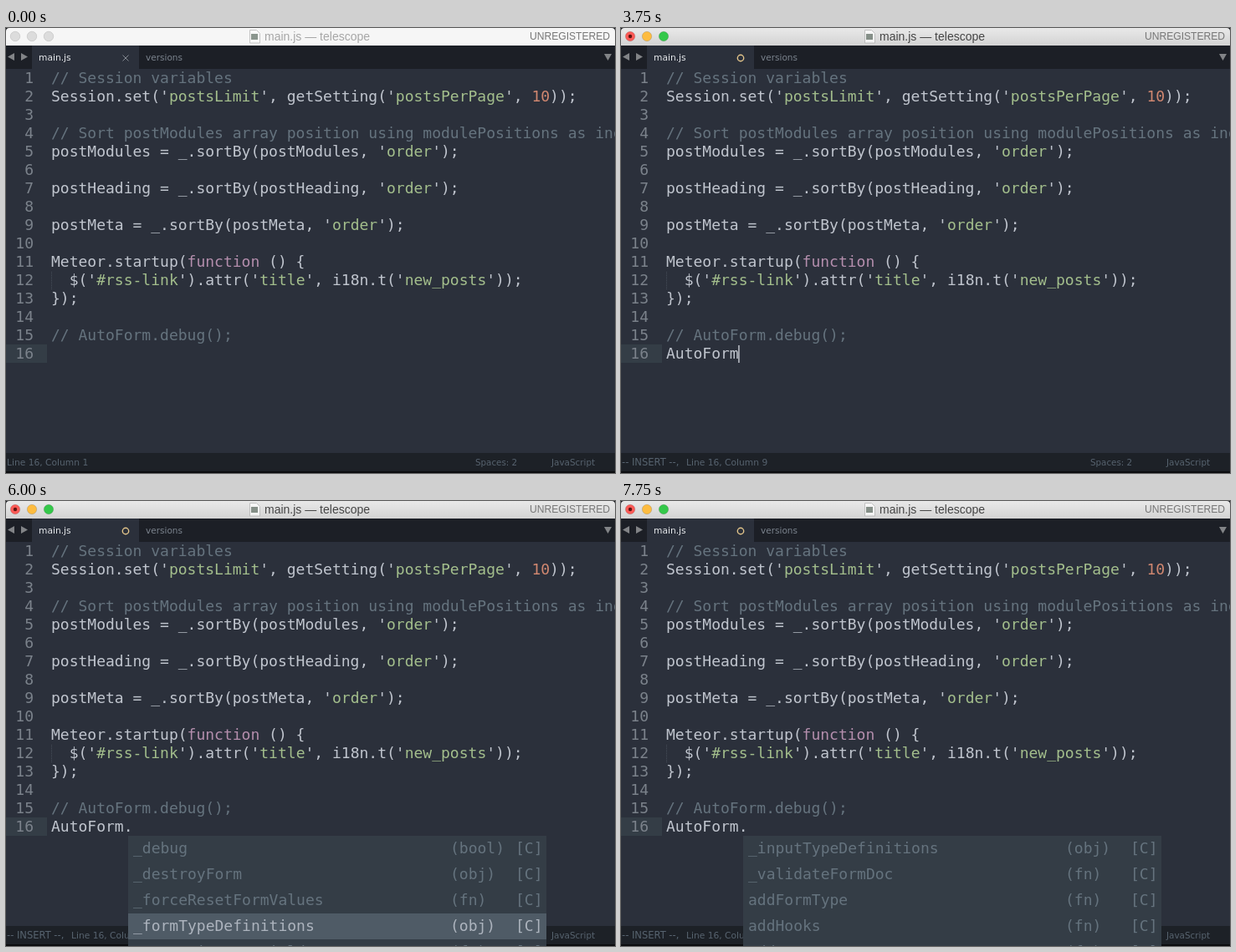
Animation, 728 px wide and 533 px high, one loop 8 s. Source, as an HTML page:

```html
<!DOCTYPE html>
<html lang="en">
<head>
<meta charset="utf-8">
<title>Editor</title>
<style>
  html, body { margin: 0; width: 100%; height: 100%; overflow: hidden; background: #14171c; }
  svg { display: block; width: 728px; height: 533px; }
  text { white-space: pre; }
  .code { font: 18px "DejaVu Sans Mono", monospace; fill: #c0c5ce; }
  .ui { font: 10.7px "DejaVu Sans", sans-serif; fill: #57636f; }
  .title { font: 14px "Liberation Sans", sans-serif; }
  .num { fill: #7b828b; text-anchor: end; }
  .comment { fill: #65737e; }
  .string { fill: #a3be8c; }
  .keyword { fill: #b48ead; }
  .number { fill: #d08770; }
</style>
</head>
<body>
<svg id="stage" viewBox="0 0 728 533">
  <defs>
    <linearGradient id="chrome" x2="0" y2="1">
      <stop stop-color="#e9e9e9"/><stop offset="1" stop-color="#d3d3d3"/>
    </linearGradient>
  </defs>
  <path id="bar" d="M0 21V4Q0 0 4 0H724Q728 0 728 4V21Z"/>
  <g id="lights"></g>
  <circle id="unsaved" cx="11" cy="10" r="2.2" fill="#5d1512"/>
  <g id="icon">
    <path d="M291.5 2.5h8l4 4v11.500h-12z" fill="#fbfbfb" stroke="#b5b5b5"/>
    <rect x="293" y="7" width="8" height="7" fill="#68766c"/>
  </g>
  <text id="name" class="title" x="309" y="15">main.js — telescope</text>
  <text class="title" x="626" y="14" style="font-size:12.1px" fill="#777">UNREGISTERED</text>

  <rect y="21" width="728" height="28" fill="#1c1f26"/>
  <rect y="49" width="728" height="460" fill="#2b303b"/>
  <rect x="31" y="21" width="128" height="28" fill="#2b303b"/>
  <path d="M10 30v9l-8-4.500zM18 30v9l8-4.500zM715 31h9l-4.500 8z" fill="#828487"/>
  <text class="ui" x="39" y="39" style="fill:#e8eaed">main.js</text>
  <text class="ui" x="167" y="39" style="font-size:10.5px;fill:#7b838d">versions</text>
  <path id="close" d="M139.500 32.500l7 7m0-7l-7 7" stroke="#858a92"/>
  <circle id="dirty" cx="143" cy="36" r="3.700" fill="none" stroke="#e3c58b" stroke-width="1.400"/>

  <rect y="379" width="49" height="22" fill="#343d46"/>
  <path d="M54.500 292v21" stroke="#464d58" stroke-dasharray="1 1"/>
  <g id="lines"></g>
  <text id="typed" class="code" x="54" y="396"></text>
  <rect id="caret" y="380" width="1.300" height="21" fill="#d5d9df"/>

  <rect y="509" width="728" height="22" fill="#1d2127"/>
  <rect y="531" width="728" height="2" fill="#0b0c0f"/>
  <text id="mode" class="ui" x="1" y="524" style="font-size:11.500px">-- INSERT --,</text>
  <text id="pos" class="ui" y="524"></text>
  <text class="ui" x="561" y="524" style="font-size:10.300px">Spaces: 2</text>
  <text class="ui" x="652" y="524" style="font-size:10.400px">JavaScript</text>
  <g id="popup"></g>
</svg>
<script>
const $ = id => document.getElementById(id);
const LOOP = 8000, CHAR = 10.836, ROW = 31;

const source = `// Session variables
Session.set('postsLimit', getSetting('postsPerPage', 10));

// Sort postModules array position using modulePositions as index
postModules = _.sortBy(postModules, 'order');

postHeading = _.sortBy(postHeading, 'order');

postMeta = _.sortBy(postMeta, 'order');

Meteor.startup(function () {
  $('#rss-link').attr('title', i18n.t('new_posts'));
});

// AutoForm.debug();
`.split('\n');

const paint = line => line.startsWith('//')
  ? `<tspan class="comment">${line}</tspan>`
  : line.replace(/'([^']*)'|\bfunction\b|\b10\b/g, (m, str) =>
      str ? `'<tspan class="string">${str}</tspan>'`
          : `<tspan class="${m === '10' ? 'number' : 'keyword'}">${m}</tspan>`);

$('lines').innerHTML = source.map((line, i) => {
  const y = 66 + i * 22;
  return `<text class="code num" x="33" y="${y}">${i + 1}</text>
    <text class="code" x="54" y="${y}">${paint(line)}</text>`;
}).join('');

const members = [
  ['_debug', 'bool'], ['_destroyForm', 'obj'], ['_forceResetFormValues', 'fn'],
  ['_formTypeDefinitions', 'obj'], ['_getOptionsForField', 'fn'], ['_globalHooks', 'obj'],
  ['_hooks', 'obj'], ['_inputTypeDefinitions', 'obj'], ['_validateFormDoc', 'fn'],
  ['addFormType', 'fn'], ['addHooks', 'fn'], ['addInputType', 'fn']
];

function popupMarkup(items, x, width, typeX, selected) {
  const height = Math.min(items.length * ROW, 132);
  const rows = items.map(([name, type], i) => {
    const y = 401 + i * ROW, on = i === selected;
    const cell = (cx, s) =>
      `<text class="code" x="${cx}" y="${y + 21}" style="fill:${on ? '#adb4be' : '#65737e'}">${s}</text>`;
    return (on ? `<rect x="${x}" y="${y}" width="${width}" height="${ROW}" fill="#4f5b66"/>` : '') +
      cell(x + 6, name) + cell(typeX, `(${type})`) + cell(x + width - 37, '[C]');
  });
  return `<rect x="${x}" y="401" width="${width}" height="${height}" fill="#343d46"/>` + rows.join('');
}

// Each step changes part of the state: [time, changes]
const steps = [
  [0, { focus: false, insert: false, text: '', list: '', sel: 0, top: 0 }],
  [500, { focus: true }],
  [2250, { insert: true }],
  [2750, { text: 'A' }],
  [3000, { list: 'word' }],
  [3250, { text: 'AutoFo' }],
  [3750, { text: 'AutoForm', list: '' }],
  [4250, { text: 'AutoForm.', list: 'members' }],
  [5750, { sel: 1 }],
  [6000, { sel: 3 }],
  [6250, { sel: 4 }],
  [6500, { sel: 6 }],
  [6750, { sel: 9, top: 2 }],
  [7000, { sel: 11, top: 4 }],
  [7250, { sel: 12, top: 5 }],
  [7500, { sel: 13, top: 6 }],
  [7750, { sel: 14, top: 7 }]
];

function caretOn(t) {
  if (t < 2000) return t % 1000 >= 500;
  if (t < 4250) return t >= 2250;
  return (t + 750) % 1000 < 500;
}

const show = (id, on) => $(id).setAttribute('visibility', on ? 'visible' : 'hidden');

function drawState(s) {
  const dirty = s.text !== '';
  $('bar').setAttribute('fill', s.focus ? 'url(#chrome)' : '#f6f6f6');
  $('lights').innerHTML = ['#fc5b57', '#fdbc40', '#34c84a'].map((color, i) =>
    `<circle cx="${11 + i * 20}" cy="10" r="5.700" fill="${s.focus ? color : '#dcdcdc'}"
      stroke="${s.focus ? '#0002' : '#cfcfcf'}"/>`).join('');
  $('name').setAttribute('fill', s.focus ? '#454545' : '#a6a6a6');
  $('icon').setAttribute('opacity', s.focus && !dirty ? 1 : 0.75);
  show('unsaved', dirty);
  show('dirty', dirty);
  show('close', !dirty);
  show('mode', s.insert);
  $('typed').textContent = s.text;
  $('caret').setAttribute('x', 53.600 + s.text.length * CHAR);
  $('pos').setAttribute('x', s.insert ? 78 : 1);
  $('pos').textContent = `Line 16, Column ${s.text.length + 1}`;
  $('popup').innerHTML =
    s.list === 'word' ? popupMarkup([['AutoForm', 'obj']], 48, 305, 240, 0) :
    s.list === 'members' ? popupMarkup(members.slice(s.top, s.top + 5), 146, 500, 531, s.sel - s.top) : '';
}

let last = -1;
function tick() {
  const t = performance.now() % LOOP;
  const past = steps.filter(([at]) => at <= t);
  if (past.length !== last) {
    last = past.length;
    drawState(Object.assign({}, ...past.map(([, change]) => change)));
  }
  show('caret', caretOn(t));
  requestAnimationFrame(tick);
}
tick();
</script>
</body>
</html>
```
